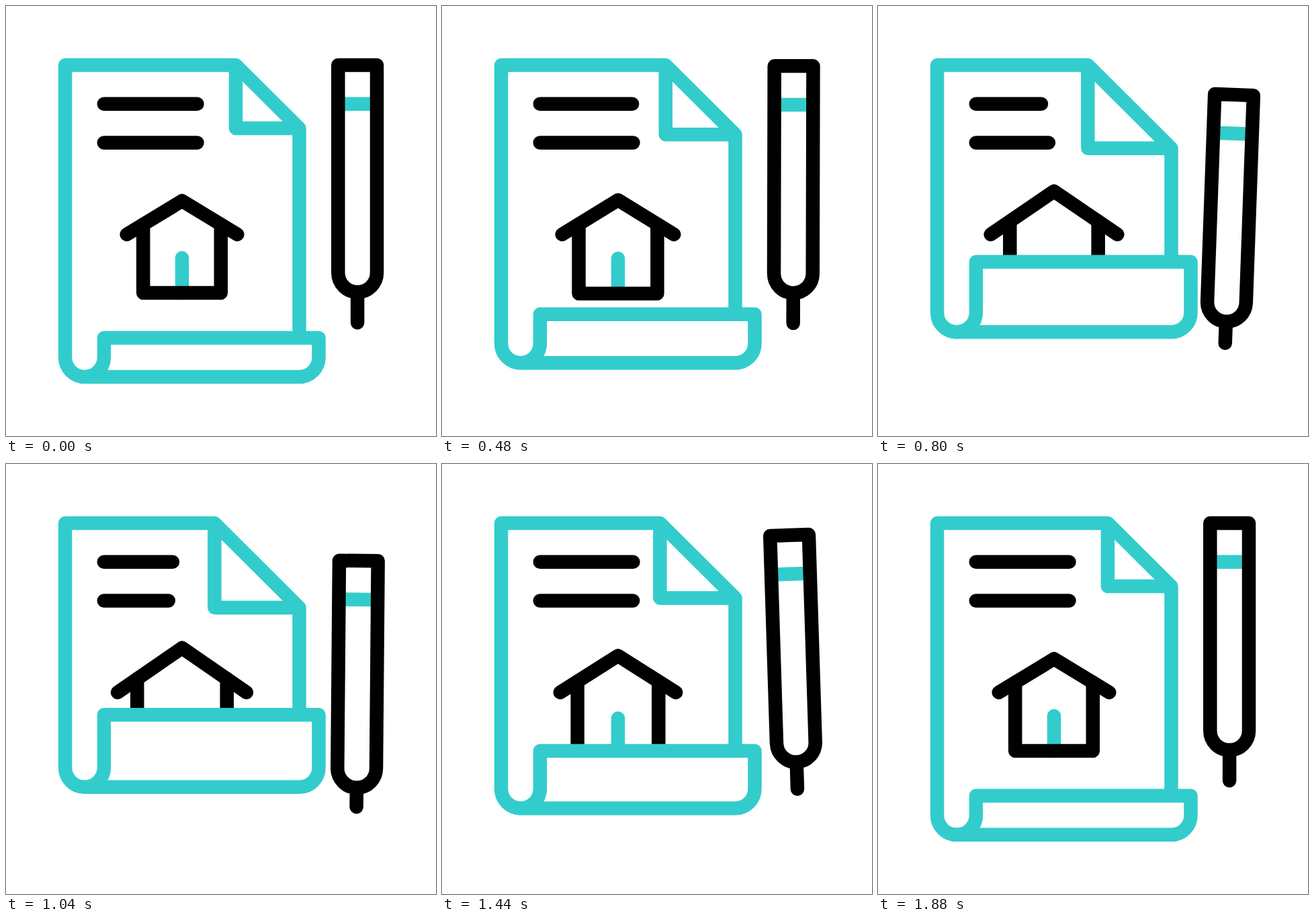
Animation of 640x640 px, one loop 1920 ms. Source, as an HTML page:

```html
<!DOCTYPE html>
<html lang="en">
<head>
<meta charset="utf-8">
<title>House plan and pen</title>
<style>
  html, body { margin: 0; width: 100%; height: 100%; overflow: hidden; background: #fff; }
  svg { display: block; width: 100vw; height: 100vh; }
  path { fill: none; stroke: #000; stroke-width: 20.5; stroke-linecap: round; stroke-linejoin: round; }
  .teal { stroke: #3cc; }
  #curl { fill: #fff; }
  #band { stroke-linecap: butt; }
</style>
</head>
<body>
<svg viewBox="0 0 640 640">
  <path id="line1"/>
  <path id="line2"/>
  <path id="door" class="teal"/>
  <path id="walls"/>
  <path id="roof"/>
  <path id="sheet" class="teal"/>
  <path id="curl" class="teal"/>
  <g id="pen">
    <path id="band" class="teal" d="M500 145.7H546"/>
    <path id="lead"/>
    <path d="M494.3 88H552V397a28.85 28.85 0 0 1-57.7 0Z"/>
  </g>
</svg>
<script>
const LOOP = 1920, STEP = 40;
const el = id => document.getElementById(id);
const draw = (id, d) => el(id).setAttribute('d', d);

// Symmetric cubic Bezier ease-in-out, solved for progress by bisection.
function ease(u) {
  if (u <= 0) return 0;
  if (u >= 1) return 1;
  let lo = 0, hi = 1;
  for (let i = 0; i < 30; i++) {
    const s = (lo + hi) / 2, r = 1 - s;
    if (1.8 * s * r * r + 1.2 * r * s * s + s ** 3 < u) lo = s; else hi = s;
  }
  return lo * lo * (3 - 2 * lo);
}

const ramp = (t, from, to) => ease((t - from) / (to - from));
const pulse = (t, start, peak, end) => ramp(t, start, peak) - ramp(t, peak, end);

function drawPaper(t) {
  const roll = 121 * pulse(t, 120, 1000, 1920);
  const top = 494 - roll, bottom = 552 - 0.589 * roll, bend = bottom - 28.9;
  const fold = 0.262 * roll, fx = 342 - fold, fy = 182 + fold;
  draw('sheet', `M117 ${bottom}A28.9 28.9 0 0 1 88.1 ${bend}V88H${fx}L436.5 ${fy}V${top}` +
    `M${fx} 88V${fy}H436.5`);
  draw('curl', `M117 ${bottom}H436.6A28.9 28.9 0 0 0 465.5 ${bend}V${top}H145.9V${bend}` +
    `A28.9 28.9 0 0 1 117 ${bottom}`);
}

function drawHouse(t) {
  const grow = 16.3 * pulse(t, 320, 1000, 1740);
  const apex = 290 - grow, eave = 82.3 + 0.84 * grow, wall = 57.8 + 0.55 * grow;
  const base = 427 + 0.8 * grow;
  const wallTop = apex + (340 - apex) * wall / eave;
  draw('roof', `M${262 - eave} 340L262 ${apex}L${262 + eave} 340`);
  draw('walls', `M${262 - wall} ${wallTop}V${base}H${262 + wall}V${wallTop}`);
  draw('door', `M262 ${375 + 0.75 * grow}V${base}`);
}

function drawLines(t) {
  draw('line1', `M145.8 145.7H${284.5 - 43 * pulse(t, 400, 885, 1370)}`);
  draw('line2', `M145.8 203.4H${284.5 - 43 * pulse(t, 510, 1000, 1480)}`);
}

function drawPen(t) {
  const drop = 56 * pulse(t, 385, 1040, 1734);
  const tilt = 2.05 * (ramp(t, 385, 810) - 2 * ramp(t, 810, 1320) + ramp(t, 1320, 1734));
  draw('lead', `M523.1 426V${471.2 - 0.3 * drop}`);
  el('pen').setAttribute('transform', `translate(0 ${drop}) rotate(${tilt} 523.1 280)`);
}

function render(now) {
  const t = Math.floor(now % LOOP / STEP) * STEP;
  drawPaper(t);
  drawHouse(t);
  drawLines(t);
  drawPen(t);
}

const start = performance.now();
function tick() {
  render(performance.now() - start);
  requestAnimationFrame(tick);
}
tick();
</script>
</body>
</html>
```
